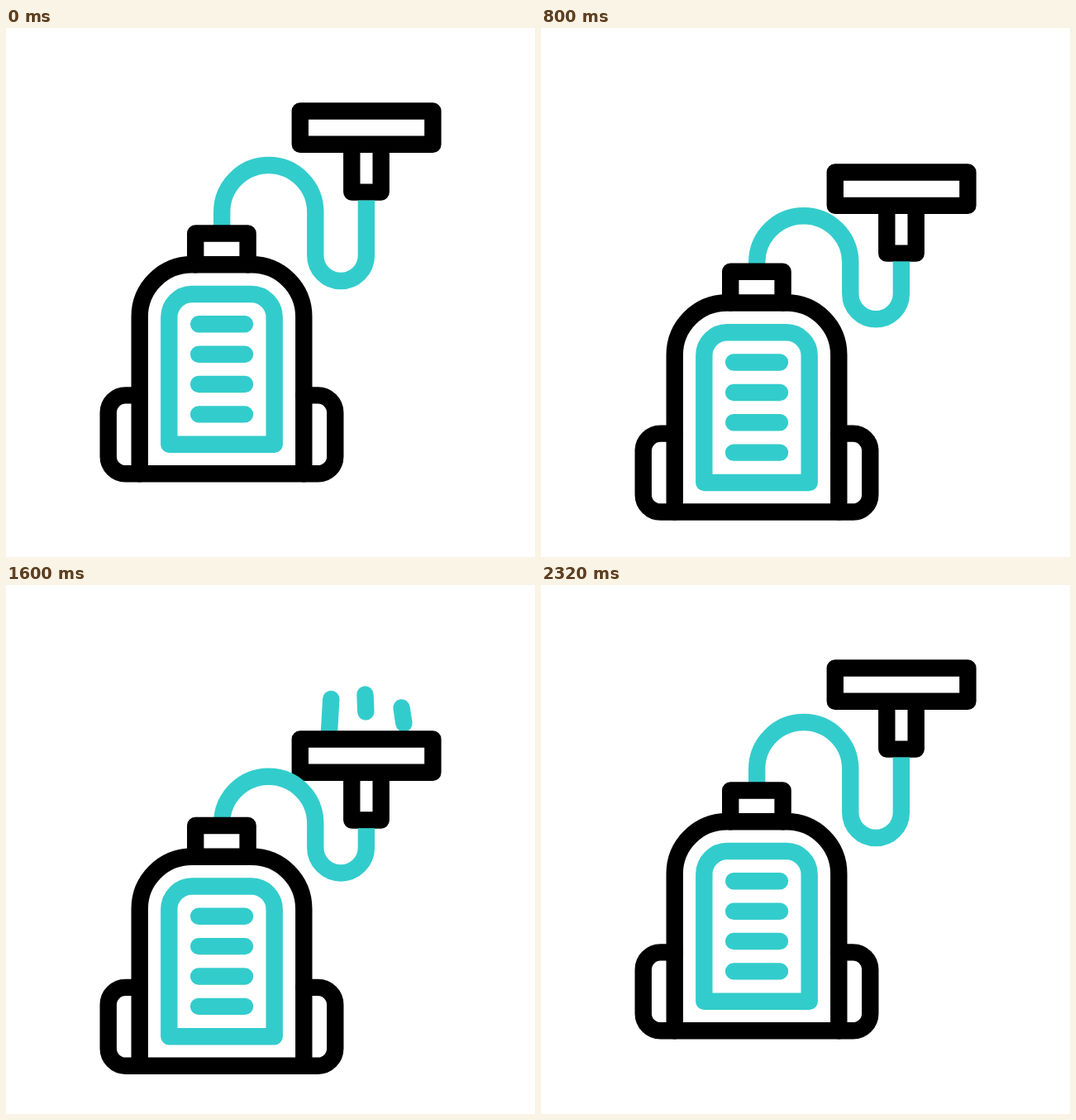
Recreate the animation shown at these times as an HTML page. Size 640x640 px, loop 2400 ms.

```html
<!DOCTYPE html>
<html lang="en">
<head>
<meta charset="utf-8">
<title>Backpack vacuum</title>
<style>
  html, body { margin: 0; width: 100%; height: 100%; overflow: hidden; background: #fff; }
  svg { display: block; width: 100vw; height: 100vh; }
  path { fill: none; stroke: #000; stroke-width: 20.4; stroke-linecap: round; stroke-linejoin: round; }
  .teal path, path.teal { stroke: #3cc; }
  #hose { stroke-linecap: butt; }
  #head path { fill: #fff; }
</style>
</head>
<body>
<svg viewBox="0 0 640 640">
  <g id="rig">
    <g class="teal">
      <path id="left"/>
      <path id="mid"/>
      <path id="right"/>
    </g>
    <g id="head">
      <path d="M418.3 140.8V198.6H453.7V140.8"/>
      <path d="M355.8 100.5H516.4V140.8H355.8Z"/>
    </g>
    <path id="hose" class="teal"/>
    <path d="M229.2 286.3V248.5H292.6V286.3"/>
    <path d="M161.7 539.3V349.3a63 63 0 0 1 63-63H297.3a63 63 0 0 1 63 63V539.3"/>
    <path d="M161.7 444.4H144.6a20.9 20.9 0 0 0-20.9 20.9V518.4a20.9 20.9 0 0 0 20.9 20.9H377.4a20.9 20.9 0 0 0 20.9-20.9V465.3a20.9 20.9 0 0 0-20.9-20.9H360.3"/>
    <g class="teal">
      <path d="M197.3 503.8V350a28 28 0 0 1 28-28H296.7a28 28 0 0 1 28 28V503.8Z"/>
      <path d="M233.1 358.3H289M233.1 394.7H289M233.1 431H289M233.1 467.4H289"/>
    </g>
  </g>
</svg>
<script>
const LOOP = 2400, STEP = 20, HALF = 1160;
const $ = id => document.getElementById(id);
const clamp = (v, lo = 0, hi = 1) => Math.min(hi, Math.max(lo, v));
const span = (t, a, b) => clamp((t - a) / (b - a));
const lerp = (a, b, p) => a + (b - a) * p;

// Cubic bezier (.63, 0, .4, 1), solved by bisection
function ease(x) {
  let lo = 0, hi = 1, s;
  for (let i = 0; i < 24; i++) {
    s = (lo + hi) / 2;
    if (1.89 * s - 2.58 * s * s + 1.69 * s ** 3 < x) lo = s; else hi = s;
  }
  return s * s * (3 - 2 * s);
}

// Eased track through [time, value] pairs
function track(keys, t) {
  for (let i = 1; i < keys.length; i++) {
    const [a, va] = keys[i - 1], [b, vb] = keys[i];
    if (t < b) return va === vb ? va : lerp(va, vb, ease((t - a) / (b - a)));
  }
  return keys[keys.length - 1][1];
}

const BODY = [[0, 0], [HALF, 54], [2 * HALF, 0]];
const HEAD = [[0, 0], [640, 43.8], [990, 0], [1120, 0], [1640, 43.8], [2170, 0]];

// Draw a streak from y0 to y1 along x(y), or hide it
function streak(id, on, x, y0, y1) {
  const seen = on && y0 < y1;
  $(id).setAttribute('d', seen ? `M${x(y0)} ${y0}L${x(y1)} ${y1}` : '');
}

function dust(t, drop) {
  const p = t % HALF, inlet = 103 + drop;

  const lean = lerp(0.058, 0.121, span(p, 440, 480));
  streak('left', p >= 380 && p < 650, y => 393.3 - (y - 95.5) * lean,
    lerp(95.5, inlet, span(p, 540, 640) ** 2), lerp(95.5, inlet, span(p, 380, 430)));

  streak('mid', p >= 415 && p < 660, y => 434.5 + (y - 90) * 0.04,
    lerp(90, inlet, span(p, 550, 650) ** 2), Math.min(inlet, 90 + (p - 415) * 0.84));

  const fall = 20 + 86 * (Math.max(0, p - 210) / 230) ** 3;
  streak('right', p >= 210 && p < 490, y => 478.5 + (y - 106) * 0.155,
    fall, Math.min(inlet, fall + 19));
}

function draw(t) {
  const drop = track(HEAD, t), top = 222.6 + drop * 0.535;
  $('rig').setAttribute('transform', `translate(0 ${track(BODY, t)})`);
  $('head').setAttribute('transform', `translate(0 ${drop})`);
  $('hose').setAttribute('d',
    `M261.2 246V${top}a56.55 56.55 0 0 1 113.1 0V275.2a30.8 30.8 0 0 0 61.6 0V${208.4 + drop}`);
  dust(t, drop);
}

const start = performance.now();
function frame() {
  const t = (performance.now() - start) % LOOP;
  draw(Math.floor(t / STEP) * STEP);
  requestAnimationFrame(frame);
}
frame();
</script>
</body>
</html>
```
